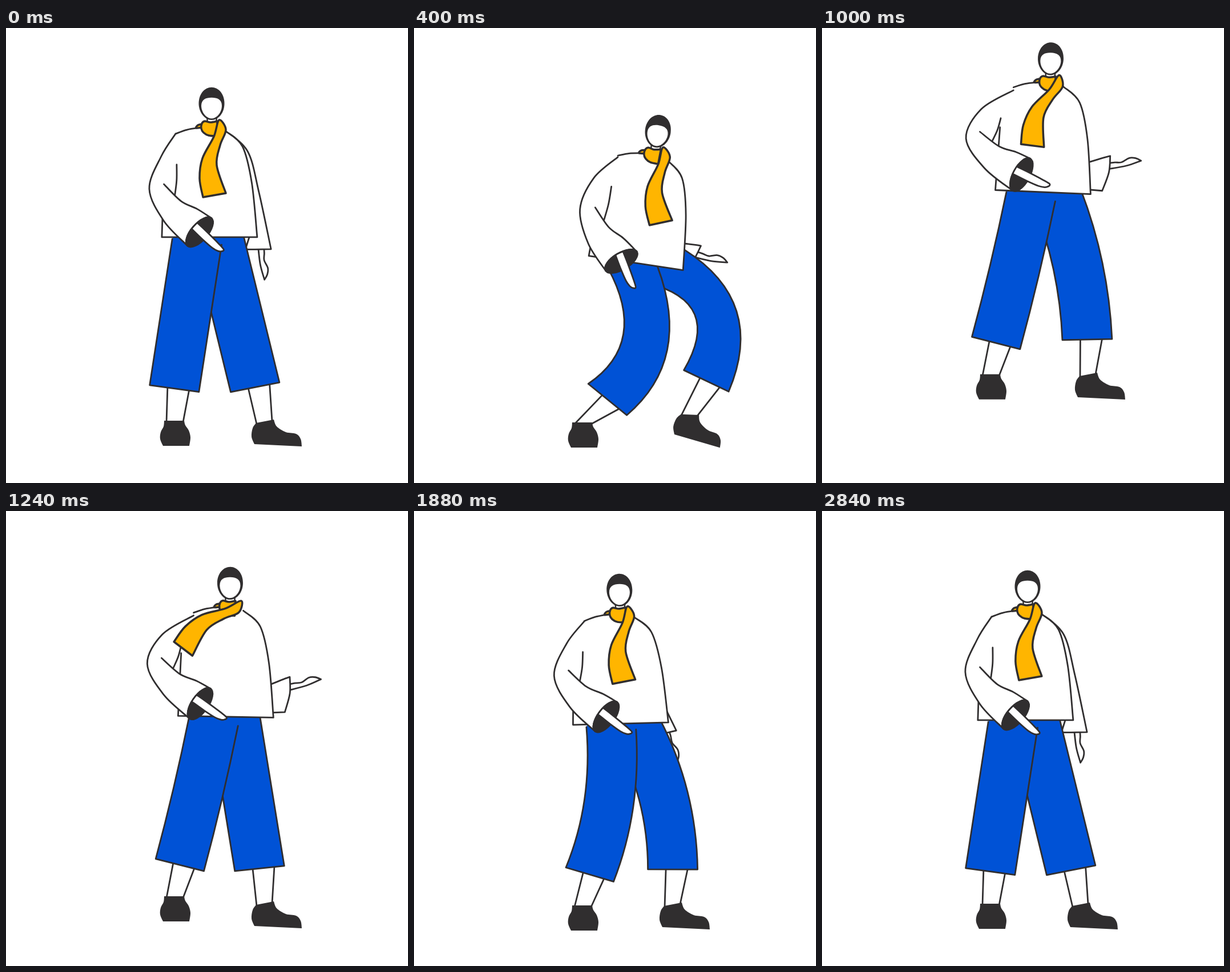
An HTML page with a canvas for the animation above (2880 ms loop, 704 px wide and 796 px high).

```html
<!DOCTYPE html>
<html lang="en">
<head>
<meta charset="utf-8">
<title>Dancing figure</title>
<style>
html, body { margin: 0; width: 100%; height: 100%; overflow: hidden; background: #fff; }
canvas { display: block; }
</style>
</head>
<body>
<canvas id="stage" width="704" height="796"></canvas>
<script>
const ctx = document.getElementById('stage').getContext('2d');
const INK = '#302e2f', BLUE = '#0052d6', YELLOW = '#ffb500', WHITE = '#fff';
const LOOP = 2880, STEP = 40, SETTLED = 2240;

// Angles in degrees, bends in pixels of knee bulge, cuff relative to the chin.
const rest = {
  at: 0, chinX: 360, chinY: 160, lean: 0,
  cuffX: -21, cuffY: 197, flex: 1, reach: 33, palm: 84,
  footY: 731, heelX: 435, heelY: 728, roll: 0, bendFront: 0, bendRear: 0, scarf: 0
};
const poses = [
  rest,
  { ...rest, at: 400, chinX: 423, chinY: 208, lean: 8.6, cuffX: -60, cuffY: 200, flex: 19,
    reach: 27, palm: 14, footY: 734, heelX: 456, heelY: 711, roll: 13.4,
    bendFront: 46, bendRear: 55, scarf: -2 },
  { ...rest, at: 760, chinX: 407, chinY: 169, lean: 4.1, cuffX: -50, cuffY: 172, flex: -13,
    reach: 49, palm: -1, footY: 733, heelX: 464, heelY: 715, bendFront: 2, bendRear: 31, scarf: -17 },
  { ...rest, at: 1240, chinX: 392, chinY: 170, lean: 1, cuffX: -52, cuffY: 183, flex: -5,
    reach: 54, palm: -14, footY: 734, heelY: 742, bendFront: 2, scarf: 47 },
  { ...rest, at: 1520, chinX: 381, chinY: 190, lean: -1.4, cuffX: -55, cuffY: 187, flex: -4,
    reach: 39, palm: -3, footY: 734, bendFront: 42, bendRear: 41 },
  { ...rest, at: 1880, chinX: 360.5, chinY: 166, lean: -1.4, cuffX: -24, cuffY: 194, flex: -3,
    reach: 27, palm: 70, footY: 734, bendFront: 15, bendRear: 16, scarf: -1 },
  { ...rest, at: SETTLED },
  { ...rest, at: LOOP }
];
const jump = { start: 765, end: 1265, height: 84 };

// Smooth cubic between neighbouring poses, standing still where a value repeats.
function poseAt(t) {
  let k = 0;
  while (t >= poses[k + 1].at) k++;
  const from = poses[k], to = poses[k + 1], span = to.at - from.at;
  const s = (t - from.at) / span, s2 = s * s, s3 = s2 * s;
  const slope = (j, key) => {
    const p = poses[j - 1], c = poses[j], n = poses[j + 1];
    return p && n && c[key] !== p[key] && c[key] !== n[key] ? (n[key] - p[key]) / (n.at - p.at) : 0;
  };
  const pose = {};
  for (const key in rest) {
    pose[key] = from[key] + (to[key] - from[key]) * (3 * s2 - 2 * s3) +
      span * (slope(k, key) * (s3 - 2 * s2 + s) + slope(k + 1, key) * (s3 - s2));
  }
  return pose;
}

// Ballistic arc, then the body sinks on with the landing speed and recovers.
function airborne(t) {
  const half = (jump.end - jump.start) / 2, u = (t - jump.start - half) / half;
  const lift = Math.abs(u) < 1 ? jump.height * (1 - u * u) : 0;
  const after = Math.max(0, t - jump.end);
  return { lift, sink: 2 * jump.height / half * after * Math.exp(-after / 60) };
}

const rad = degrees => degrees * Math.PI / 180;
const mix = (a, b, f) => [a[0] + (b[0] - a[0]) * f, a[1] + (b[1] - a[1]) * f];
const shift = (p, x, y) => [p[0] + x, p[1] + y];

function place(origin, degrees) {
  const c = Math.cos(rad(degrees)), s = Math.sin(rad(degrees));
  return (x, y) => [origin[0] + x * c - y * s, origin[1] + x * s + y * c];
}

function spline(...pts) {
  ctx.lineTo(...pts[0]);
  for (let i = 0; i < pts.length - 1; i++) {
    const a = pts[i], b = pts[i + 1], p = pts[i - 1] || a, n = pts[i + 2] || b;
    ctx.bezierCurveTo(
      a[0] + (b[0] - p[0]) / 6, a[1] + (b[1] - p[1]) / 6,
      b[0] - (n[0] - a[0]) / 6, b[1] - (n[1] - a[1]) / 6, b[0], b[1]);
  }
}
const line = (...pts) => pts.forEach(p => ctx.lineTo(...p));
function arc(a, control, b) {
  ctx.lineTo(...a);
  ctx.quadraticCurveTo(...control, ...b);
}

function fill(color, trace) {
  ctx.beginPath();
  trace();
  ctx.fillStyle = color;
  ctx.fill();
}
function stroke(trace, width = 2.8) {
  ctx.beginPath();
  trace();
  ctx.lineWidth = width;
  ctx.stroke();
}
function shape(color, trace, width) {
  fill(color, trace);
  stroke(trace, width);
}

const LEGS = {
  front: { waistX: -22, waistY: 8, shift: .36, pivot: 8, lean: -1.5, curl: .38, tilt: .38, slide: .15 },
  rear: { waistX: 17, waistY: 6, shift: .65, pivot: 18, lean: 3, curl: .46, tilt: .7, slide: 0 }
};
const HALF_WIDTH = 43.5, CALF = 101;

function drawLeg(spec, hip, foot, bend, ankles, drawShoe) {
  const waist = shift(hip, spec.waistX + spec.shift * bend, spec.waistY);
  const pivot = shift(foot, spec.pivot, 0);
  const angle = spec.lean +
    Math.atan2(waist[0] - pivot[0], pivot[1] - waist[1]) * 180 / Math.PI;
  const calf = angle + spec.curl * bend;
  const top = place(waist, angle - spec.tilt * bend);
  const hem = place(place(pivot, calf)(0, -CALF), calf * 1.16);
  const edge = x => {
    const a = top(x, 0), b = hem(x, 0), dx = b[0] - a[0], dy = b[1] - a[1];
    const k = 2 * bend / Math.hypot(dx, dy);
    return [a, shift(mix(a, b, .5), (dy + dx * spec.slide) * k, (dy * spec.slide - dx) * k), b];
  };

  const cuffs = [hem(-12, 0), hem(26, 0)].map((p, i) => [p, ankles[i]]);
  fill(WHITE, () => line(...cuffs[0], ankles[1], cuffs[1][0]));
  cuffs.forEach(side => stroke(() => line(...side)));
  drawShoe();

  const outline = () => {
    arc(...edge(-HALF_WIDTH));
    arc(...edge(HALF_WIDTH).reverse());
  };
  fill(BLUE, () => { outline(); line(top(42, -40), top(-38, -15)); });
  stroke(outline);
}

function drawRearLeg(pose, hip, heel) {
  const at = place(heel, pose.roll);
  drawLeg(LEGS.rear, hip, heel, pose.bendRear, [at(4, -35), at(31, -40)], () => fill(INK, () => {
    spline(at(34, -43), at(39, -31), at(55, -21), at(73, -18), at(81, -9), at(83, 4));
    spline(at(0, 0), at(-5, -13), at(-3, -28), at(3, -37));
  }));
}

function drawFrontLeg(pose, hip, foot) {
  const at = place(foot, 0);
  drawLeg(LEGS.front, hip, foot, pose.bendFront, [at(6, -41), at(35, -41)], () => fill(INK, () => {
    spline(at(37, -44), at(39, -36), at(45, -27), at(48, -15), at(46, 0));
    spline(at(0, 0), at(-5, -12), at(-4, -24), at(1, -34), at(2, -44));
  }));
}

function drawBackArm(pose, chest, torso) {
  const corner = chest(54, 47);
  const wrist = shift(corner, pose.reach, 120 + 60 * Math.sin(rad(pose.palm)));
  const at = place(wrist, pose.palm), level = Math.cos(rad(pose.palm));
  shape(WHITE, () => {
    spline(at(-4, -5), at(8, -4.5), at(20, -3), at(34, -8), at(45, -6), at(54, 0));
    spline(at(54, 0), at(27, 4.5), at(-4, 5));
  });
  const elbow = at(-100, -5 - 12 * level);
  const shoulder = shift(corner, .6 * (elbow[0] - corner[0]) - 8, 9);
  shape(WHITE, () => {
    spline(chest(24, 20), shoulder, elbow, at(2, -17));
    spline(at(2, -17), at(-5 * level, 11), at(-22 * level, 26 + 15 * level));
    line(torso(72, -8));
  });
}

function drawTorso(chest, torso) {
  const neck = chest(-19, 14), shoulder = chest(-63, 25), corner = chest(54, 47);
  const hem = torso(83.5, 0);
  const slope = () => spline(neck, shift(mix(neck, shoulder, .55), 0, -2), shoulder);
  const sides = () => {
    line(torso(-80, -110), torso(-83.5, 0));
    spline(hem, shift(mix(corner, hem, .4), 6, 0), corner, chest(24, 20));
  };
  fill(WHITE, () => { slope(); sides(); });
  stroke(slope);
  stroke(sides);
}

// The bend of the wrist is shared between forearm, cuff and hand.
function drawArm(pose, chest, cuff) {
  const joint = share => place(cuff, 40 + share * pose.flex);
  const fore = joint(.6), sleeve = joint(1), hand = joint(1.4);
  const shoulder = chest(-63, 25), elbow = fore(-116, 0);
  const raise = shoulder[0] - elbow[0] - 49;
  const start = shift(shoulder, 0, Math.max(0, .15 * raise));
  const armpit = shift(shoulder, -.65 * raise, 54), fold = fore(-75, -21);
  const low = sleeve(0, 32), high = sleeve(0, -32);
  const outer = () => spline(start, shift(mix(start, elbow, .5), -3 - .35 * raise, -9),
    elbow, fore(-60, 26), low);
  fill(WHITE, () => { outer(); line(high, fore(-29, -28), fore(-60, -20), fold, armpit); });
  stroke(outer);
  stroke(() => spline(fore(-102, -23), fore(-60, -20), fore(-29, -28), high));
  stroke(() => spline(armpit, shift(mix(armpit, fold, .5), 1.5, 1), fold));

  const rim = (from, to) => ctx.ellipse(...cuff, 14.5, 32, rad(40 + pose.flex), from, to);
  shape(INK, () => rim(0, 2 * Math.PI));
  shape(WHITE, () => spline(hand(-13, -9.5), hand(6, -8.9), hand(38, -6.9), hand(52, -5),
    hand(51, 0), hand(46, 3.6), hand(35, 6), hand(13, 6.2), hand(-14, 5)));
  stroke(() => rim(Math.PI / 2, Math.PI * 1.5));
}

function drawScarf(at, chin, swing) {
  const end = place(shift(chin, 14, 10), swing);
  const piece = (...pts) => shape(YELLOW, () => { spline(...pts); ctx.closePath(); }, 3.5);
  piece(at(-16, 8), at(-24, 10), at(-27, 15), at(-16, 14));
  piece(at(9, 29), at(-5, 28), at(-14, 23), at(-18, 16), at(-17, 7), at(-12, 3), at(-2, 5), at(10, 3));
  piece(end(-29, 126), end(-35, 93), end(-30, 58), end(-10, 20), end(-1, -9),
    end(11, 8), end(1, 35), end(-5, 70), end(11, 119));
}

function drawNeck(at) {
  fill(WHITE, () => line(at(-8, -4), at(9, -4), at(9, 8), at(-8, 8)));
  stroke(() => line(at(-8, -4), at(-7, 6)), 2.4);
  stroke(() => line(at(9, -4), at(8, 6)), 2.4);
}

function drawHead(chin, tilt) {
  ctx.save();
  ctx.translate(...chin);
  ctx.rotate(rad(tilt));
  ctx.translate(0, -28);
  ctx.fillStyle = INK;
  ctx.fill(new Path2D('M-22.5 0C-22.5-17-12-28.3 0-28.3S22.5-17 22.5 0 11.5 29 0 29-22.5 16-22.5 0'));
  ctx.fillStyle = WHITE;
  ctx.fill(new Path2D('M-18 4C-18-7-10-10.3 0-10.3S18-7 18 4 9.5 26.3 0 26.3-18 15-18 4'));
  ctx.restore();
}

function draw(t) {
  const pose = poseAt(t), { lift, sink } = airborne(t);
  const chin = [pose.chinX, pose.chinY - lift + sink];
  const chest = place(chin, pose.lean);
  const hip = place(chin, pose.lean + 1)(0, 206);
  const torso = place(hip, pose.lean);
  const sway = t > SETTLED ? 2 * Math.sin(Math.PI * (t - SETTLED) / (LOOP - SETTLED)) ** 2 : 0;

  ctx.fillStyle = WHITE;
  ctx.fillRect(0, 0, 704, 796);
  ctx.strokeStyle = INK;
  ctx.lineCap = ctx.lineJoin = 'round';
  drawBackArm(pose, chest, torso);
  drawRearLeg(pose, hip, [pose.heelX, Math.min(pose.heelY - lift, 728)]);
  drawFrontLeg(pose, hip, [275, Math.min(pose.footY - lift, 734)]);
  drawTorso(chest, torso);
  drawArm(pose, chest, shift(chin, pose.cuffX, pose.cuffY));
  drawNeck(chest);
  drawScarf(chest, chin, pose.scarf + sway);
  drawHead(chin, pose.lean);
}

function tick() {
  const t = performance.now() % LOOP;
  draw(Math.floor(t / STEP) * STEP);
  requestAnimationFrame(tick);
}
tick();
</script>
</body>
</html>
```
